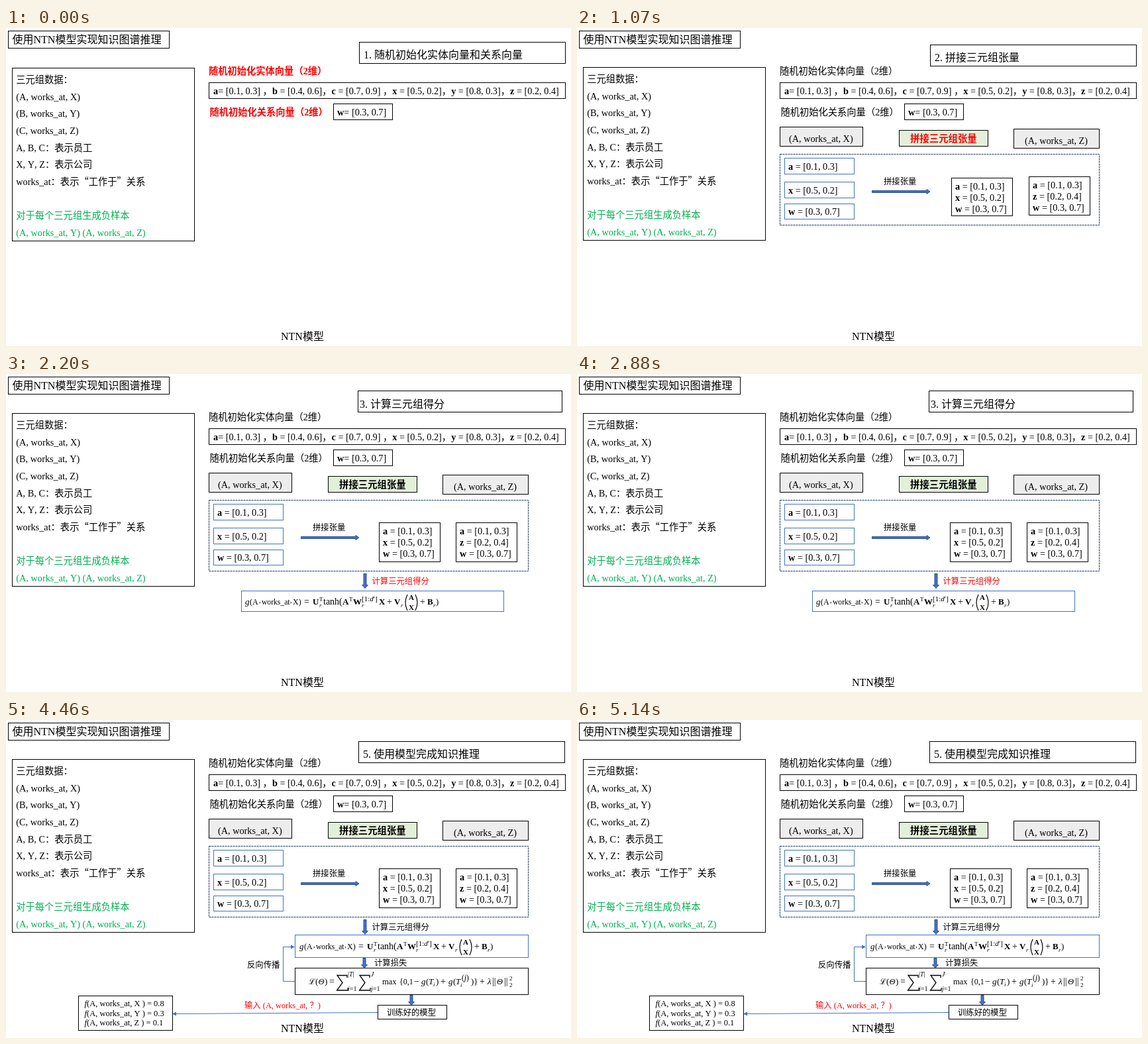
An HTML page for the animation above (5590 ms loop, 853 by 480 pixels).

```html
<!DOCTYPE html>
<html lang="zh-CN">
<head>
<meta charset="utf-8">
<title>NTN模型</title>
<style>
  html, body { margin: 0; width: 100%; height: 100%; overflow: hidden; background: #fff; }
  svg { display: block; width: 853px; height: 480px; }
  text {
    font-family: "Liberation Serif", "Noto Sans CJK SC", serif;
    font-weight: 350; font-kerning: none;
    text-spacing-trim: space-all; text-autospace: no-autospace;
  }
  .cjk { font-family: "Noto Sans CJK SC", sans-serif; }
  .b { font-weight: bold; }
  .i { font-style: italic; }
</style>
</head>
<body>
<svg id="stage" viewBox="0 0 853 480" xmlns="http://www.w3.org/2000/svg"></svg>
<script>
const stage = document.getElementById('stage');
const LOOP = 5590;
const STEP_STARTS = [0, 1070, 2200, 3330, 4460];
const BODY = 14.27, HEAD = 16, NOTE = 12.35;
const RED = '#ff0000', GREEN = '#00b050', BLUE = '#4472c4', NAVY = '#2f528f';

const text = (s, x, y, size = BODY, fill = '#000', cls = '') =>
  `<text x="${x}" y="${y}" font-size="${size}" fill="${fill}" class="${cls}">${s}</text>`;
const bold = s => `<tspan class="b">${s}</tspan>`;
const italic = s => `<tspan class="i">${s}</tspan>`;

// Box given by its left, top, right and bottom edges.
const box = (l, t, r, b, stroke = '#000', fill = 'none', extra = '') =>
  `<rect x="${l + .5}" y="${t + .5}" width="${r - l - 1}" height="${b - t - 1}" stroke="${stroke}" fill="${fill}" ${extra}/>`;
const path = (d, stroke, fill = 'none', width = 1) =>
  `<path d="${d}" stroke="${stroke}" fill="${fill}" stroke-width="${width}"/>`;

const vec = (name, a, b, gap = ' ') => `${bold(name)}${gap}= [${a}, ${b}]`;
const A = vec('a', 0.1, 0.3), X = vec('x', 0.5, 0.2), Z = vec('z', 0.2, 0.4), W = vec('w', 0.3, 0.7);
const ENTITIES = [vec('a', 0.1, 0.3, '') + ' ', vec('b', 0.4, 0.6), vec('c', 0.7, 0.9) + ' ',
  X, vec('y', 0.8, 0.3), Z].join('，');

const TRIPLES = ['三元组数据：', '(A, works_at, X)', '(B, works_at, Y)', '(C, works_at, Z)',
  'A, B, C：表示员工', 'X, Y, Z：表示公司',
  'works_at：表示<tspan class="cjk">“工作于”</tspan>关系', '',
  '对于每个三元组生成负样本', '(A, works_at, Y) (A, works_at, Z)'];

// Title box (left, top, right, bottom), then text position and text.
const HEADINGS = [
  [533, 21, 845, 54, 540, 46, '1. 随机初始化实体向量和关系向量'],
  [533, 25, 845, 58, 540, 50, '2. 拼接三元组张量'],
  [531, 25, 840, 58, 534, 51, '3. 计算三元组得分'],
  [533, 26, 845, 59, 540, 51, '4. 通过反向传播计算损失，完成模型训练'],
  [532, 32, 844, 65, 539, 57, '5. 使用模型完成知识推理']
];

// Each piece: string, x, baseline offset, size, class.
const formula = (pieces, x, y) => pieces.map(([s, dx, dy = 0, size = 13, cls = '']) =>
  text(s, x + dx, y + dy, size, '#000', cls)).join('');

const SCORE = [
  ['g', 0, 0, 13, 'i'], ['(A', 7, 0, 12], [',', 21, -3, 11], ['works_at', 25, 0, 11.6],
  [',', 68, -3, 11], ['X)', 72, 0, 12], ['=', 89, 0, 14],
  ['U', 102, 0, 13, 'b'], ['T', 112, -5, 9], ['r', 112, 4, 9, 'i'], ['tanh(', 118, 0, 14],
  ['A', 147, 0, 13, 'b'], ['T', 157, -5, 9], ['W', 163, 0, 13, 'b'], ['r', 176, 4, 9, 'i'],
  [`[1:${italic('d')}′]`, 176, -5, 11], ['X', 202, 0, 13, 'b'], ['+', 214, 0, 14],
  ['V', 225, 0, 13, 'b'], ['r', 235, 4, 9, 'i'],
  ['A', 247, -7, 11, 'b'], ['X', 247, 8, 11, 'b'],
  ['+', 264, 0, 14], ['B', 275, 0, 13, 'b'], ['r', 284, 4, 9, 'i'], [')', 288, 0, 13]
];
const LOSS = [
  ['ℒ', 0, 0, 12], ['(', 10], ['Θ', 14.5, 0, 12.5, 'i'], [')', 24], ['=', 31, 0, 14],
  [`|${italic('T')}|`, 59, -12, 10], [`${italic('i')}=1`, 59, 10, 10],
  ['J', 94, -12, 10, 'i'], [`${italic('j')}=1`, 94, 10, 10],
  ['max', 111, 0, 12.5], ['{0,1', 137, 0, 12], ['−', 159, 0, 14],
  ['g', 170, 0, 13, 'i'], ['(', 177], ['T', 181, 0, 13, 'i'], ['i', 188, 3, 9, 'i'], [')', 192],
  ['+', 199, 0, 14], ['g', 211, 0, 13, 'i'], ['(', 218], ['T', 222, 0, 13, 'i'],
  ['i', 229, 4, 9, 'i'], [`(${italic('j')})`, 231, -6, 11.5], [')}', 245],
  ['+', 258, 0, 14], ['λ', 270, 0, 13, 'i'], ['||', 277, 0, 14], ['Θ', 284, 0, 12.5, 'i'],
  ['||', 295, 0, 14], ['2', 303, -6, 9], ['2', 303, 4, 9]
];
const sum = x => path(`M${x + 16} 389v-3.500H${x + 1}l8 11-8.500 11.500h16.500v-4`, '#000', 'none', 1.3);
const tallParens = (x, y) =>
  path(`M${x + 245} ${y - 15}q-6 12 0 24M${x + 257} ${y - 15}q6 12 0 24`, '#000', 'none', 1.2);

// Block arrow pointing down, centred on x.
const downArrow = (x, top, bottom) =>
  path(`M${x - 2} ${top + .5}h4V${bottom - 5.5}h2.500l-4.500 5-4.500-5h2.500z`, NAVY, BLUE);

function base(step) {
  const now = step === 0;
  const color = now ? RED : '#000', cls = now ? 'b' : '';
  const top = now ? 60 : 59;
  const [l, t, r, b, x, y, title] = HEADINGS[step];
  return box(3, 4, 247, 31) + text('使用NTN模型实现知识图谱推理', 9.5, 23, HEAD)
    + box(l, t, r, b) + text(title, x, y, HEAD)
    + box(9, top, 285, top + 262)
    + TRIPLES.map((s, i) =>
        text(s, 15.3, Math.round(top + 23 + i * 25.65), BODY, i > 7 ? GREEN : '#000')).join('')
    + text('随机初始化实体向量（2维）', 306, 70, BODY, color, cls)
    + box(306, 82, 845, 107) + text(ENTITIES, 313, 100)
    + text('随机初始化关系向量（2维）', 307.5, 132, BODY, color, cls)
    + box(494, 114, 584, 139) + text(vec('w', 0.3, 0.7, ''), 500, 132)
    + text('NTN模型', 415, 471, HEAD);
}

function stack(lines, l, t, b) {
  return box(l, t, l + 93, b) + lines.map((s, i) => text(s, l + 6, t + 18 + i * 17)).join('');
}

function concat(step) {
  const now = step === 1;
  const inputs = [[A, 196, 221], [X, 232, 257], [W, 265, 289]];
  return box(306, 149, 432, 179, '#000', '#ededed') + text('(A, works_at, X)', 320, 172)
    + box(486, 154, 621, 179, '#000', '#e2f0d9')
    + text('拼接三元组张量', 503, 171.5, 14.4, now ? RED : '#000', 'b')
    + box(659, 152, 789, 182, '#000', '#ededed') + text('(A, works_at, Z)', 676, 175)
    + box(306, 190, 789, 298, '#1f3864', 'none', 'stroke-dasharray="3 1"')
    + inputs.map(([s, t, b]) => box(313, t, 419, b, BLUE) + text(s, 319, (t + b) / 2 + 5)).join('')
    + text('拼接张量', 463, 235.5, NOTE)
    + path('M445.5 245.5H528v-2l5 3.500-5 3.500v-2H445.500z', NAVY, BLUE)
    + stack([A, X, W], now ? 565 : 563, now ? 226 : 224, 284)
    + stack([A, Z, W], now ? 682 : 679, 224, now ? 283 : 284);
}

function score(step) {
  const now = step === 2;
  const x = now ? 361 : 443, y = now ? 348 : 346;
  return downArrow(542, 301, 324)
    + text('计算三元组得分', 552.5, 316.5, NOTE, step < 4 ? RED : '#000')
    + (now ? box(355, 327, 752, 359, BLUE) : box(436, 324, 789, 359, BLUE))
    + formula(SCORE, x, y) + tallParens(x, y);
}

function train(step) {
  const color = step === 3 ? RED : '#000';
  return downArrow(541, 359, 375) + text('计算损失', 556, 370.5, NOTE, color)
    + box(436, 374, 789, 415) + formula(LOSS, 457, 399) + sum(499) + sum(533)
    + path('M436 394.5H418.500V342.500H431', BLUE) + path('M436 342.500l-6-3v6z', 'none', BLUE)
    + text('反向传播', 364, 373.5, NOTE, color)
    + downArrow(612, 415, 431)
    + box(561, 430, 666, 452) + text('训练好的模型', 575, 445.5, NOTE, color);
}

function infer() {
  const results = [['X', 0.8], ['Y', 0.3], ['Z', 0.1]];
  return path('M561 441.500L256 443.500', BLUE) + path('M251 443.500l6-3v6z', 'none', BLUE)
    + text('输入 (A, works_at, ？)', 360, 435, NOTE, RED)
    + box(109, 416, 252, 469)
    + results.map(([name, p], i) =>
        text(`${italic('f')}(A, works_at, ${name} ) = ${p}`, 118.5, Math.round(432 + i * 14.6), 12.5)).join('');
}

const LAYERS = [base, concat, score, train, infer];
let shown = -1;

function render(ms) {
  const t = ms % LOOP;
  const step = STEP_STARTS.filter(start => start <= t).length - 1;
  if (step === shown) return;
  shown = step;
  stage.innerHTML = LAYERS.slice(0, step + 1).map(layer => layer(step)).join('');
}

const begin = performance.now();
function tick() {
  render(performance.now() - begin);
  requestAnimationFrame(tick);
}
tick();
</script>
</body>
</html>
```
